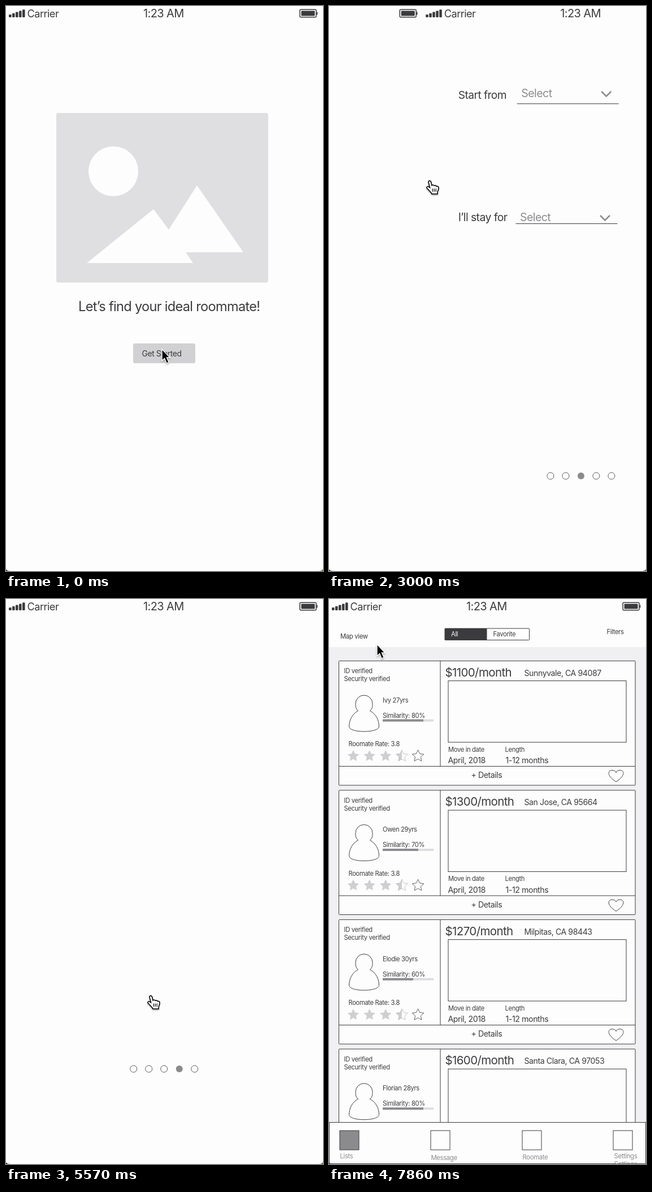
Write an HTML page that moves like this. It is 561 px wide and 998 px high and loops after 8000 ms.

```html
<!DOCTYPE html>
<html lang="en">
<head>
<meta charset="utf-8">
<title>Roommate finder</title>
<style>
  html, body { margin: 0; width: 100%; height: 100%; overflow: hidden; background: #fefdfe; }
  svg { display: block; width: 100%; height: 100%; }
  text { font-family: Inter, Roboto, sans-serif; letter-spacing: -.03em; white-space: pre; }
</style>
</head>
<body>
<svg id="stage" viewBox="0 0 561 998"></svg>
<script>
const W = 561, H = 998, LOOP = 8000, STEP = 1000 / 7, SLIDE = 300;
const INK = '#3b3b3d', GREY = '#8b8b8e', PAPER = '#fefdfe', BUTTON = '#d1d0d2';

const text = (x, y, size, str, fill = INK) =>
  `<text x="${x}" y="${y}" font-size="${size}" fill="${fill}">${str}</text>`;
const rect = (x, y, w, h, fill = 'none', stroke = 'none', r = 0) =>
  `<rect x="${x}" y="${y}" width="${w}" height="${h}" rx="${r}" fill="${fill}" stroke="${stroke}"/>`;
const circle = (x, y, r, fill = 'none', stroke = 'none', width = 1) =>
  `<circle cx="${x}" cy="${y}" r="${r}" fill="${fill}" stroke="${stroke}" stroke-width="${width}"/>`;
const path = (d, fill = 'none', stroke = 'none', width = 1) =>
  `<path d="${d}" fill="${fill}" stroke="${stroke}" stroke-width="${width}"/>`;
const line = (x1, y, x2, stroke = INK, width = 1) => path(`M${x1} ${y}H${x2}`, 'none', stroke, width);
const group = (id, content, attrs = '') => `<g id="${id}" ${attrs}>${content}</g>`;
const range = n => [...Array(n).keys()];

const chevron = (x, y) => path(`M${x - 8.5} ${y - 4}l8.5 8.5l8.5 -8.5`, 'none', GREY, 2.5);
const button = (x, y, w, h, label, size, pad = 15) =>
  rect(x, y, w, h, BUTTON, 'none', 3) + text(x + pad, y + h / 2 + size * .36, size, label);
const dots = (active, y = 830) => range(5).map(i => i === active
  ? circle(225.7 + 27 * i, y, 6, GREY)
  : circle(225.7 + 27 * i, y, 6, 'none', '#5a5a5d')).join('');

const statusBar = () =>
  range(5).map(i => rect(5 + 6 * i, 15 - 2.2 * i, 4.6, 5 + 2.2 * i, INK, 'none', 1.2)).join('') +
  text(37.5, 20.3, 18.2, 'Carrier') + text(243, 20.3, 20, '1:23 AM') +
  path('M522 6.3h25a2 2 0 0 1 2 2v9.4a2 2 0 0 1 -2 2h-25a2 2 0 0 1 -2 -2v-9.4a2 2 0 0 1 2 -2z', 'none', INK, 1.5) +
  rect(522.5, 8.5, 24, 9, INK, 'none', 1) + rect(549.5, 10.5, 1.8, 5, INK);

function welcome() {
  return rect(89, 189, 375, 299.5, '#dfdee0', 'none', 4) + circle(190, 292, 44, PAPER) +
    path('M143 454L261 359L288 395L338 317L420 435H318L331 454Z', PAPER) +
    text(128, 538.5, 23.6, 'Let’s find your ideal roommate!') +
    button(225, 596, 110, 35, 'Get Started', 13.9, 15.5);
}

function lookingFor() {
  return text(69.5, 168.5, 19.5, 'I’m looking for') +
    button(70, 196, 167, 33, 'A roomate and a room', 13.8) +
    button(71.5, 247, 214.5, 33, 'A roomate (I’ve found a room)', 13.6) + dots(0);
}

function place() {
  return text(69, 168.5, 19.2, 'In') +
    path('M99.3 175C95 166 86.8 160 86.8 150.5a12.5 12.5 0 0 1 25 0C111.8 160 103.5 166 99.3 175Z', GREY) +
    circle(99.3, 152.5, 4.8, PAPER) + line(103, 171.2, 280) +
    circle(289, 152.5, 9.2, 'none', GREY, 3.6) +
    path('M295.5 159.5L306.5 170', 'none', GREY, 4.8) + dots(1);
}

function dates() {
  const field = (x, y, label, base, mark, fill) =>
    line(x, y, x + 180) + text(x + 7.5, base, 19.6, label, fill) + chevron(x + 158, mark);
  const row = (y, size, month, year, fill) => text(77, y, size, month, fill) + text(287, y, size + .7, year, fill);
  const picker = rect(-2, 189.5, 562.5, 109, 'none', INK) + row(213, 19.5, 'January', '2017', GREY) +
    row(250.2, 23, 'Feburery', '2017') + row(283.5, 19.5, 'March', '2018', GREY);
  return text(62.5, 164, 19.2, 'Start from') + text(62.5, 380, 19.4, 'I’ll stay for') +
    group('dateEmpty', field(166.5, 172.7, 'Select', 161, 155, GREY)) +
    group('datePicker', picker) +
    group('dateChosen', field(166.5, 172.7, 'February 2018', 161, 155)) +
    group('stayEmpty', field(164.2, 384.5, 'Select', 379.5, 374, GREY)) +
    group('stayChosen', field(165, 386, '3 months', 374.3, 369)) + dots(2);
}

const HABITS = [
  ['Clean - Messy', 'I’m clean but not obssessive', 101],
  ['Work - Home', 'I work half day everyday', 257],
  ['Sleep early - Sleep late', 'I sleep around 10 pm', 101],
  ['Rise early - Rise late', 'I get up before 9 am', 101],
  ['No drinking at all - Drink every day', 'I sometimes drink 1 or 2 glasses a week', 257],
  ['No smoking at all - Smoke every day', 'I don’t smoke at all', 75],
  ['No Guest - Party 24/7', 'I have friends come over once a week, but no overnight stay', 257],
  ['Don’t cook - Cook every day', 'I cook 2 or 3 times a week, only light meal', 257],
  ['Just roommate - Best friends with roommate', 'I like to be friends with my roomates', 182]
];

function describe() {
  const sliders = HABITS.map(([title, note, knob], i) => {
    const y = i ? 177.3 + 83.6 * i : 176.3;
    return text(59.5, y - 43, 19.55, title) + text(61.5, y - 22.3, 11.2, note, GREY) +
      line(60, y, 510, GREY, 3) + circle(knob + .2, y - .6, 15.2, PAPER, INK);
  });
  return text(56, 75, 23.8, 'Describe yourself so that we’ll find') +
    text(56, 105, 23.8, 'roommates that are simmilar to you') + sliders.join('') +
    dots(4, 861.3) + button(196, 883.5, 162, 29, 'Check My Future Roomates', 11.2);
}

const LISTINGS = [
  ['Ivy 27yrs', 80, '$1100', 'Sunnyvale, CA 94087'],
  ['Owen 29yrs', 70, '$1300', 'San Jose, CA 95664'],
  ['Elodie 30yrs', 60, '$1270', 'Milpitas, CA 98443'],
  ['Florian 28yrs', 80, '$1600', 'Santa Clara, CA 97053']
];

function star(cx, cy, from = 0) {
  const points = range(10 - from).map(n => {
    const i = n + from, r = i % 2 ? 5.2 : 10.8, a = i * Math.PI / 5;
    return `${(cx + r * Math.sin(a)).toFixed(1)} ${(cy - r * Math.cos(a)).toFixed(1)}`;
  });
  if (from) points.push(`${cx} ${cy - 10.8}`);
  return `M${points.join('L')}Z`;
}

function card([who, match, price, city], i) {
  const small = (x, y, s) => text(x, y, 11.2, s);
  const avatar = 'M51.5 197.5C47 194 47 189 47 185a15 15 0 0 1 30 0C77 189 77 194 72.5 197.5C83 203 88.5 214 88.5 225C88.5 231 76 234 62 234C48 234 35.7 231 35.7 225C35.7 214 41 203 51.5 197.5Z';
  const heart = 'M508 323C490 311 494 302.5 501 302.5C505 302.5 507 304 508 306.5C509 304 511 302.5 515 302.5C522 302.5 526 311 508 323Z';
  const stars = range(3).map(n => path(star(43 + 28.6 * n, 277.5), '#cfced1')).join('') +
    path(star(129, 277.5, 5), '#cfced1') + path(star(129, 277.5), 'none', '#b5b5b8', .8) +
    path(star(157.5, 277.5), 'none', INK, .8);
  return `<g transform="translate(0 ${228.55 * i})">` +
    rect(17.5, 109.3, 524.5, 219.7, PAPER, INK, 1) + line(17.5, 295.5, 542) + path('M197 109V295.5', 'none', INK) +
    small(26.5, 131, 'ID verified') + small(26.5, 145.3, 'Security verified') +
    path(avatar, 'none', INK) + small(95, 182.7, who) + small(95, 209.7, `Similarity: ${match}%`) +
    rect(95, 212.5, 90, 4, '#dddcdf') + rect(95, 212.5, match * .9, 4, GREY) +
    small(34.5, 260, 'Roomate Rate: 3.8') + stars +
    text(205.5, 136.5, 20.5, price + '/month') + text(345.5, 135.7, 14.1, city) +
    rect(211, 144.5, 315, 108.5, 'none', INK) +
    small(211, 269.7, 'Move in date') + small(311.5, 269.7, 'Length') +
    text(210.5, 290, 14.2, 'April, 2018') + text(312.5, 290, 14.2, '1-12 months') +
    text(251.5, 316, 14.1, '+ Details') + path(heart, 'none', INK) + '</g>';
}

function results() {
  const tabs = [['Lists', 19, 988], ['Message', 180, 991], ['Roomate', 342, 990], ['Settings', 503, 988]];
  return rect(0, 85, W, 840, '#f0eff2') + text(20, 69.5, 11.3, 'Map view') +
    rect(205, 52, 149.5, 20.5, PAPER, INK, 1) + rect(205, 52, 74.5, 20.5, INK) +
    text(216, 66.3, 11.2, 'All', PAPER) + text(290.5, 66.3, 11.2, 'Favorite') +
    text(491.5, 61.5, 11.2, 'Filters') + LISTINGS.map(card).join('') +
    rect(.5, 924.5, 560, 73, PAPER, INK) +
    tabs.map(([name, x, y], i) => rect(x, 939, 34, 34, i ? PAPER : GREY, INK) +
      text(x + (i === 3 ? 1.5 : .5), y, 11.3, name, GREY)).join('') +
    text(504.5, 1002, 11.3, 'Settings', GREY);
}

const SCREENS = [welcome, lookingFor, place, dates, () => dots(3), describe, results];
const SLIDE_STARTS = [595, 1400, 2900, 5180, 5790, 6880];

// time, x, y, hand
const CURSOR = [
  [0, 276, 606, 0], [60, 276, 606, 0], [428, 299, 616, 0], [1000, 299, 616, 0],
  [1425, 150, 212, 1], [1715, 150, 212, 1], [1850, 180, 164, 1], [2010, 180, 164, 1],
  [2428, 172, 308, 1], [3000, 172, 308, 1], [3560, 234, 152, 0], [3720, 233, 151, 0],
  [4000, 288, 232, 0], [4140, 288, 240, 0], [4425, 230, 366, 1], [4700, 125, 452, 1],
  [4860, 125, 452, 1], [5280, 250, 700, 1], [5720, 250, 700, 1], [6560, 274, 897, 1],
  [6870, 274, 897, 1], [7280, 240, 640, 0], [7850, 85, 80, 0], [8000, 85, 80, 0]
];

const arrow = path('M0 0V20.5L4.6 16.4L8.2 25L12 23.3L8.4 15H14Z', '#000', '#fff', 1.3);
const hand = path('M4 3C4 0 8 0 8.5 3L10 9C11 7.5 13.5 8 14 9.5C15.5 8.3 17.5 9 18 10.5C20 9.8 22 11 22 13C22 17 20.5 18 20 21V24H10C9 21 5 18 1.5 14C-.5 11.5 2.5 10 4.5 11.5L6.5 13Z', '#fff', '#000', 1.5) +
  path('M11.2 14.5v5.5M14.2 14.5v5.5M17.2 14.5v5.5', 'none', '#000', 1.2);

document.getElementById('stage').innerHTML =
  '<filter id="shadow" x="-50%" y="-50%" width="200%" height="200%"><feDropShadow dx="0" dy="1.5" stdDeviation="1.3" flood-opacity=".4"/></filter>' +
  SCREENS.map((draw, i) => group('screen' + i, rect(0, 0, W, H, PAPER) + draw() + statusBar())).join('') +
  path('M0 995Q1 998 8 998H0Z', '#1c1c1c') + path('M561 994Q560 998 553 998H561Z', '#6b6a45') +
  group('cursor', group('arrow', arrow) + group('hand', hand), 'filter="url(#shadow)"');

const el = id => document.getElementById(id);
const show = (id, on) => el(id).setAttribute('display', on ? 'inline' : 'none');
const move = (id, x, y) => el(id).setAttribute('transform', `translate(${x.toFixed(2)} ${y.toFixed(2)})`);
const easeOut = p => 1 - (1 - Math.min(1, Math.max(0, p))) ** 3;

function render(t) {
  const position = SLIDE_STARTS.reduce((sum, start) => sum + easeOut((t - start) / SLIDE), 0);
  SCREENS.forEach((_, i) => {
    show('screen' + i, Math.abs(i - position) < 1);
    move('screen' + i, W * (i - position), 0);
  });

  show('dateEmpty', t < 3560);
  show('datePicker', t >= 3560 && t < 4140);
  show('dateChosen', t >= 4140);
  show('stayEmpty', t < 4850);
  show('stayChosen', t >= 4850);

  const next = CURSOR.findIndex(k => k[0] > t);
  const a = CURSOR[next - 1], b = CURSOR[next], p = (t - a[0]) / (b[0] - a[0]);
  move('cursor', a[1] + (b[1] - a[1]) * p, a[2] + (b[2] - a[2]) * p);
  const pointing = p > .95 ? b[3] : a[3];
  show('hand', pointing);
  show('arrow', !pointing);
}

// The picture advances seven times a second.
const begin = performance.now();
function tick() {
  const t = (performance.now() - begin) % LOOP;
  render(Math.min(55, Math.floor((t + 5) / STEP)) * STEP);
  requestAnimationFrame(tick);
}
tick();
</script>
</body>
</html>
```
